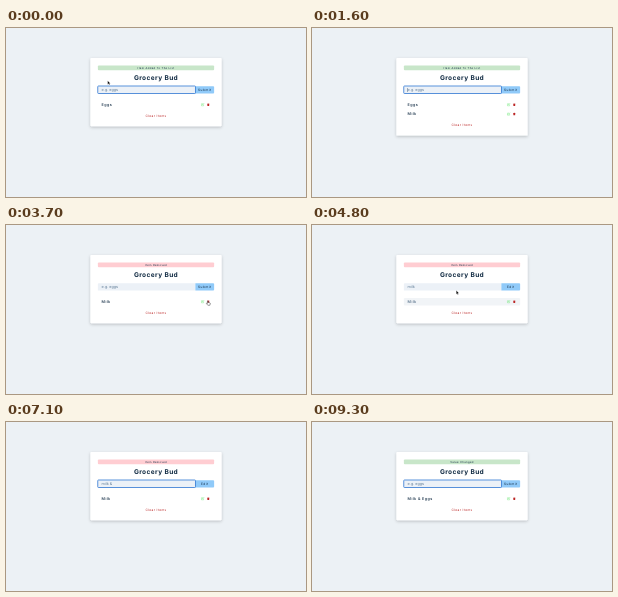
Recreate the animation shown at these times as an HTML page. Size 300 by 169 pixels, loop 9500 ms.

```html
<!DOCTYPE html>
<html lang="en">
<head>
<meta charset="utf-8">
<title>Grocery list</title>
<style>
  html, body { margin: 0; width: 100%; height: 100%; overflow: hidden; background: #ecf1f5; }
  svg { display: block; width: 100vw; height: 100vh; }
  text { font-family: Inter, "Open Sans", sans-serif; fill: #102a42; white-space: pre; text-rendering: geometricPrecision; }
  .mid { text-anchor: middle; }
  .alert { font-size: 11.2px; letter-spacing: 1.6px; }
  .head { font-size: 28px; font-weight: 700; letter-spacing: 1.6px; }
  .field { font-size: 16px; fill: #617d98; }
  .button { font-size: 13.6px; letter-spacing: 2px; }
  .item { font-size: 16px; font-weight: 500; letter-spacing: 1.6px; }
  .clear { font-size: 13.6px; letter-spacing: 1.6px; fill: #bb2525; }
</style>
</head>
<body>
<svg viewBox="0 0 1280 721" preserveAspectRatio="xMidYMin slice">
  <defs>
    <filter id="shadow" x="-20%" y="-20%" width="140%" height="140%">
      <feDropShadow dx="0" dy="5" stdDeviation="7.5" flood-color="#000" flood-opacity=".22"/>
    </filter>
    <g id="icons">
      <g fill="none" stroke="#6be675" stroke-width="1.7" stroke-linecap="round" stroke-linejoin="round">
        <path d="M839 -4H834V5H843V1"/>
        <path d="M838 1L843.5 -4.5" stroke-width="2.6"/>
      </g>
      <path d="M858 -4.9H861L861.6 -5.6H864.4L865 -4.9H868V-3.5H858ZM858.7 -2.8H867.3L866.7 5.6H859.3Z" fill="#bb2525"/>
    </g>
  </defs>

  <rect width="1280" height="721" fill="#ecf1f5"/>
  <rect id="card" x="360" y="128" width="560" rx="4" fill="#fff" filter="url(#shadow)"/>
  <rect id="alertBox" x="392" y="160" width="496" height="20" rx="4"/>
  <text id="alertText" class="mid alert" x="640" y="174"></text>
  <text class="mid head" x="640" y="220">Grocery Bud</text>

  <path d="M396 248H808V279H392V252Q392 248 396 248Z" fill="#ecf1f7"/>
  <path d="M808 248H884Q888 248 888 252V275Q888 279 884 279H808Z" fill="#90caf9"/>
  <text id="buttonText" class="mid button" x="848" y="268.4"></text>
  <rect id="ring" x="391.5" y="247.5" width="417" height="32" rx="3" fill="none" stroke="#2f76d2" stroke-width="3.4"/>
  <text id="field" class="field" x="408" y="269.2"></text>
  <rect id="caret" y="256" width="1.8" height="17" fill="#33506b"/>

  <g id="rows"></g>
  <text id="clear" class="mid clear" x="640">Clear Items</text>

  <g id="pointer" stroke-linejoin="round">
    <path id="arrow" d="M0 0V16L3.8 12.6 6.3 18.4 8.8 17.3 6.3 11.7H11.5Z" fill="#000" stroke="#fff"/>
    <path id="hand" d="M-1.6 1Q0 -1 1.6 1V7L9 8.6Q11 9.2 10.6 12L9 19H0L-6 11.5Q-6 9 -3.8 9.6L-1.6 11.5Z" fill="#fff" stroke="#000" stroke-width="1.6"/>
    <path id="beam" d="M-3 -8Q0 -8 0 -6Q0 -8 3 -8M0 -6V6M-3 8Q0 8 0 6Q0 8 3 8" fill="none" stroke="#222" stroke-width="1.5"/>
  </g>
</svg>
<script>
  const LOOP = 9500, STEP = 100, UNIT = 1280 / 300;
  const $ = id => document.getElementById(id);
  const show = (el, on) => el.setAttribute('visibility', on ? 'visible' : 'hidden');
  const setText = (el, s) => { if (el.textContent !== s) el.textContent = s; };
  const clamp = v => Math.max(0, Math.min(1, v));
  const last = (list, t) => list.filter(k => k[0] <= t).pop();
  const mix = (a, b, k) => `rgb(${a.map((v, i) => Math.round(v + (b[i] - v) * k))})`;

  const DARK = [16, 42, 66], MUTED = [97, 125, 152];
  const SUCCESS = '#c8e6c9', DANGER = '#ffcdd2';

  const alerts = [
    [0, 'Item Added To The List', SUCCESS],
    [3700, 'Item Removed', DANGER],
    [8000, 'Value Changed', SUCCESS]
  ];
  const lists = [[0, 'Eggs'], [1600, 'Eggs', 'Milk'], [3700, 'Milk'], [8000, 'Milk & Eggs']];
  const typed = [
    [0, ''], [600, 'm'], [800, 'mi'], [1200, 'mil'], [1400, 'milk'], [1600, ''],
    [4400, 'milk'], [6000, 'milk '], [6500, 'milk &'], [6600, 'milk & '], [7200, 'milk & e'],
    [7500, 'milk & eg'], [7600, 'milk & egg'], [7800, 'milk & eggs'], [8000, '']
  ];
  // the caret restarts its blink at each of these
  const blinks = [-600, 600, 800, 1200, 1400, 5200, 6000, 6500, 6600, 7200, 7500, 7600, 7800].map(t => [t]);
  // pointer runs as [time, x, y]
  const runs = [
    { end: 600, path: [[0, 101.7, 52.7]] },
    { end: 6000, from: 2400, path: [
      [2400, 110, 61], [2500, 122, 63], [2600, 140, 66], [2700, 160, 70], [2800, 176, 73.2],
      [2900, 186, 74.4], [3000, 190.7, 74.7], [3300, 201.6, 75], [3500, 201.8, 75.8],
      [3700, 201.8, 75.8], [4200, 196.6, 75.6], [4400, 196.6, 75.6], [4500, 196.6, 75.6],
      [4600, 188, 74], [4700, 167, 70], [4800, 144.3, 65.5], [4900, 134, 63],
      [5000, 129, 62], [5200, 126, 61.6]] }
  ];

  const rows = [327, 367].map(y => {
    const g = document.createElementNS('http://www.w3.org/2000/svg', 'g');
    g.innerHTML = `<rect x="392" y="${y - 16}" width="496" height="32" rx="4" fill="#ecf1f5"/>
      <text class="item" x="408" y="${y + 5.8}"></text><use href="#icons" y="${y}"/>`;
    $('rows').append(g);
    return { g, back: g.children[0], label: g.children[1] };
  });

  function pointerAt(t) {
    const run = runs.find(r => t >= (r.from || 0) && t < r.end);
    if (!run) return null;
    const p = run.path, i = p.findIndex(k => k[0] > t);
    if (i < 0) return p[p.length - 1].slice(1);
    const [a, b] = [p[i - 1], p[i]], k = (t - a[0]) / (b[0] - a[0]);
    return [1, 2].map(n => a[n] + (b[n] - a[n]) * k);
  }

  function hoverAt(t) {
    if (t < 3700) return clamp((t - 2700) / 300);
    return clamp((t - 3700) / 300) * (1 - clamp((t - 4700) / 400));
  }

  function drawPointer(t) {
    const pos = pointerAt(t);
    let kind = '';
    if (pos) {
      const [x, y] = pos;
      const onIcon = y > 73 && (x > 199.5 || x > 194.5 && x < 198.5);
      const inField = y > 58 && y < 65.4 && x < 189;
      kind = onIcon ? 'hand' : inField ? 'beam' : 'arrow';
      $('pointer').setAttribute('transform', `translate(${x * UNIT} ${y * UNIT})`);
    }
    ['arrow', 'hand', 'beam'].forEach(id => show($(id), id === kind));
  }

  function draw(t) {
    const [, message, tone] = last(alerts, t);
    setText($('alertText'), message);
    $('alertBox').setAttribute('fill', tone);

    const value = last(typed, t)[1];
    const focused = t < 3700 || t >= 5200;
    setText($('field'), value || 'e.g. eggs');
    setText($('buttonText'), t >= 4400 && t < 8000 ? 'Edit' : 'Submit');
    show($('ring'), focused);
    const width = value ? $('field').getComputedTextLength() : 0;
    $('caret').setAttribute('x', 407.8 + width);
    show($('caret'), focused && (t - last(blinks, t)[0]) % 1000 < 500);

    const items = last(lists, t).slice(1);
    const hover = hoverAt(t);
    rows.forEach((row, i) => {
      const k = i ? 0 : hover;
      show(row.g, i < items.length);
      setText(row.label, items[i] || '');
      row.back.setAttribute('opacity', k);
      row.label.style.fill = mix(DARK, MUTED, k);
    });
    const shift = (items.length - 1) * 40;
    $('card').setAttribute('height', 291 + shift);
    $('clear').setAttribute('y', 380 + shift);
    drawPointer(t);
  }

  const start = performance.now();
  function tick() {
    const t = (performance.now() - start) % LOOP;
    draw(Math.floor(t / STEP) * STEP);
    requestAnimationFrame(tick);
  }
  tick();
</script>
</body>
</html>
```
